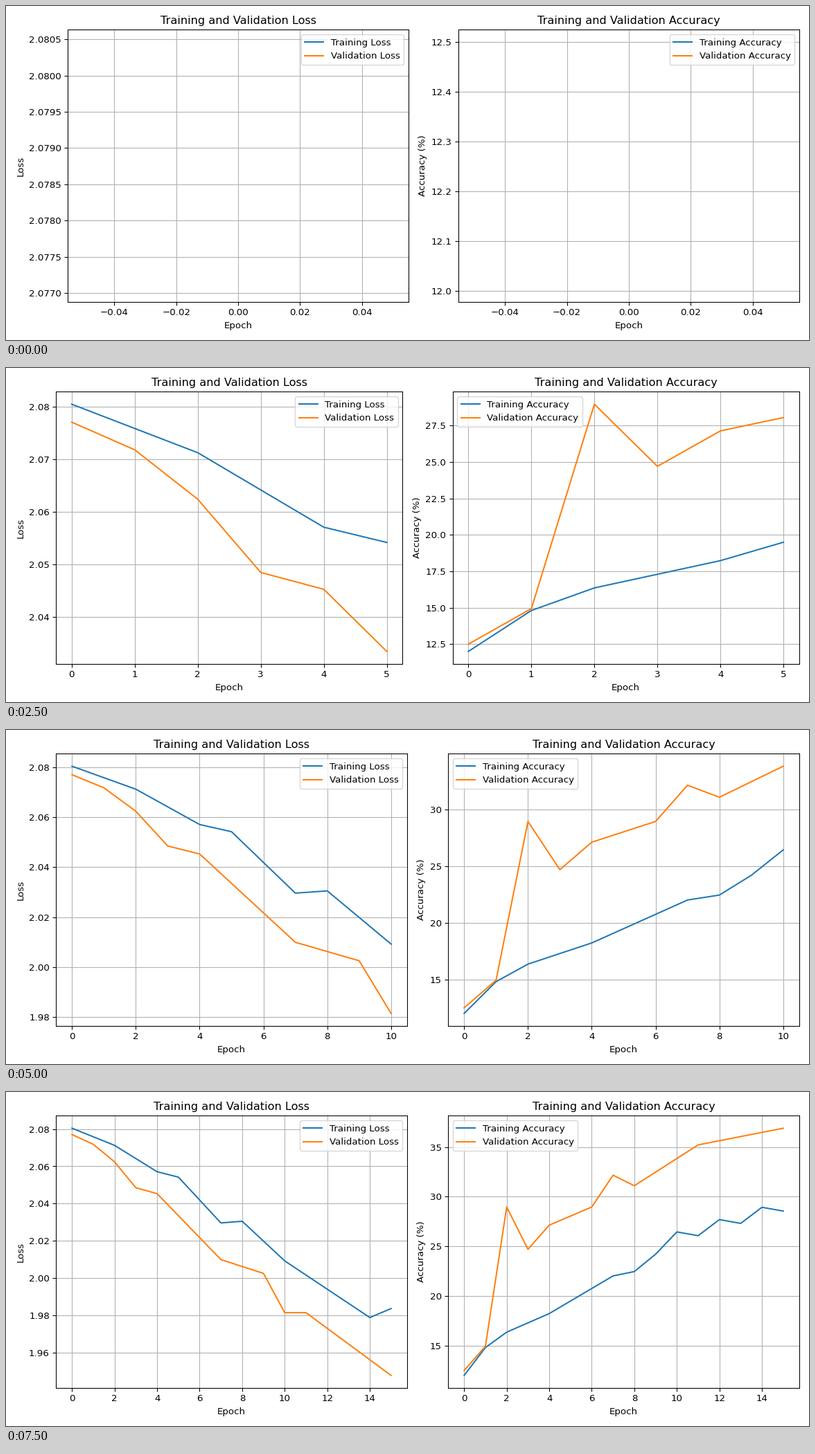
Write a matplotlib script that moves like this. It is 1159 px wide and 483 px high and loops after 8 s.

```python
import numpy as np
import matplotlib.pyplot as plt
from matplotlib.animation import FuncAnimation

EPOCHS = 16
epochs = np.arange(EPOCHS)


def curve(bends):
    """Straight runs between the given {epoch: value} bends."""
    return np.interp(epochs, list(bends), list(bends.values()))


train_loss = curve({0: 2.08046, 2: 2.07125, 4: 2.0571, 5: 2.0542, 7: 2.0296,
                    8: 2.0305, 10: 2.0092, 14: 1.9788, 15: 1.9836})
val_loss = curve({0: 2.07705, 1: 2.0718, 2: 2.0624, 3: 2.0485, 4: 2.0453,
                  7: 2.0099, 9: 2.0025, 10: 1.9814, 11: 1.9814, 15: 1.9477})
val_acc = curve({0: 12.5, 1: 14.94, 2: 28.96, 3: 24.7, 4: 27.13,
                 6: 28.96, 7: 32.16, 8: 31.1, 11: 35.21, 15: 36.89})

# Training accuracy climbs, then zigzags around its trend
zigzag = np.where(epochs >= 10, 0.5 * (-1.0) ** epochs, 0)
train_acc = zigzag + curve({0: 12.003, 1: 14.81, 2: 16.36, 4: 18.23,
                            7: 22.02, 8: 22.46, 10: 25.95, 15: 29.05})

plt.rcParams["font.family"] = "DejaVu Sans"
# 1159 x 483 pixels
fig, (ax_loss, ax_acc) = plt.subplots(1, 2, figsize=(12, 5), dpi=96.61)


def draw_panel(ax, n, train, val, name, ylabel):
    ax.clear()
    ax.plot(epochs[:n], train[:n], label=f"Training {name}")
    ax.plot(epochs[:n], val[:n], label=f"Validation {name}")
    ax.set_title(f"Training and Validation {name}")
    ax.set_xlabel("Epoch")
    ax.set_ylabel(ylabel)
    ax.legend()
    ax.grid(True)


def update(epoch):
    n = epoch + 1
    draw_panel(ax_loss, n, train_loss, val_loss, "Loss", "Loss")
    draw_panel(ax_acc, n, train_acc, val_acc, "Accuracy", "Accuracy (%)")
    fig.tight_layout()
    return []


anim = FuncAnimation(fig, update, frames=EPOCHS, init_func=lambda: [],
                     interval=500, repeat=True, repeat_delay=0)

plt.show()
```
